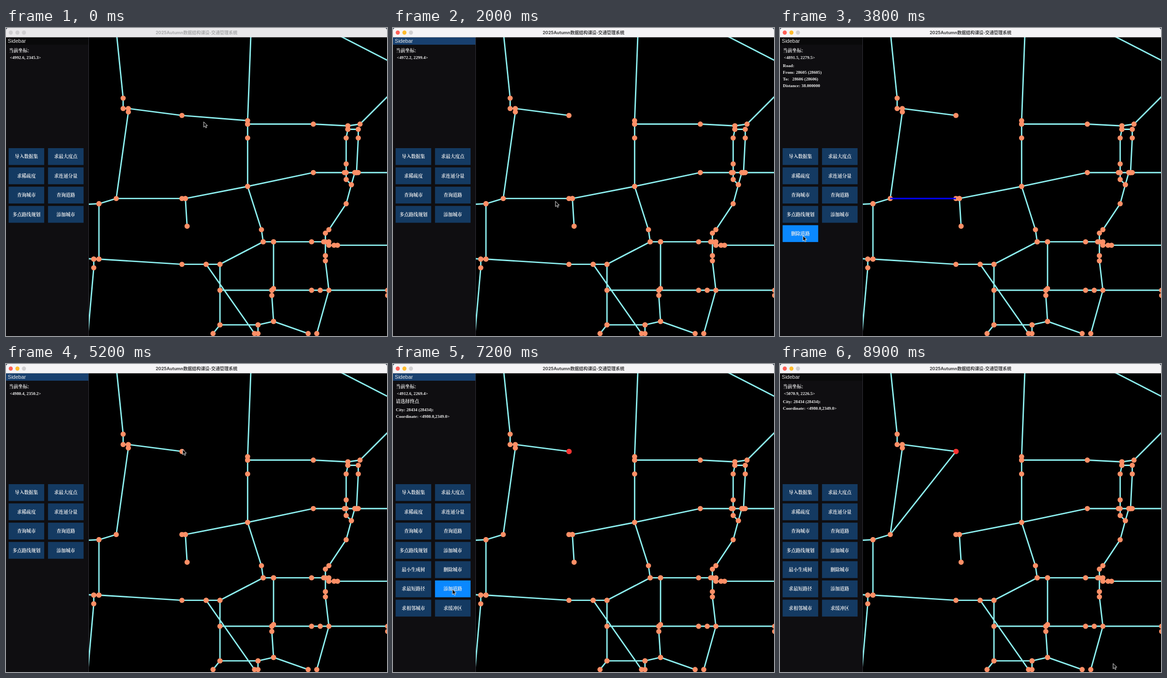
An HTML page that plays this animation: 800 by 646 pixels, repeating every 9 s.

```html
<!DOCTYPE html>
<html lang="zh">
<head>
<meta charset="utf-8">
<style>
  html, body { margin: 0; width: 100%; height: 100%; overflow: hidden; background: #1c2a3c; }
  svg { display: block; width: 800px; height: 646px; }
  text { white-space: pre; fill: #ececec; }
  .line { fill: none; stroke: #8ceeee; stroke-width: .8; }
  #nodes { fill: none; stroke: none; marker: url(#dot); }
  #picked { fill: none; stroke: #0000f5; stroke-width: .85; }
  .cjk { font: bold 9.8px "Noto Serif CJK SC", "Noto Sans CJK SC", "Noto Sans CJK", serif; }
  .info { font: bold 9.2px "Liberation Serif", serif; }
  .head { font: 11px "Liberation Sans", sans-serif; }
  .button rect { fill: #143a62; }
  .button.hover rect { fill: #0a88ff; }
  .button text { text-anchor: middle; }
  #bar { fill: #f5f4f6; }
  .title { font: 700 9px Inter, sans-serif; fill: #3c3c3e; }
  .title .han { font: 700 9.2px "Noto Sans CJK SC", "Noto Sans CJK", sans-serif; }
  .idle #bar { fill: #e9e8ea; }
  .idle .title { fill: #a8a8aa; }
  .idle .light { fill: #cecdcf; }
</style>
</head>
<body>
<svg id="app" viewBox="0 0 800 646">
  <defs>
    <marker id="dot" markerUnits="userSpaceOnUse" markerWidth="4" markerHeight="4" refX="2" refY="2">
      <circle cx="2" cy="2" r="1.5" fill="#ff8f66"/>
    </marker>
  </defs>

  <rect y="19" width="800" height="627"/>
  <g id="map">
    <path id="roads" class="line"/>
    <path id="north" class="line" d="M0 0 38 3"/>
    <path id="west" class="line" d="M-38 48H0"/>
    <path id="added" class="line" d="M0 0-38 48"/>
    <path id="nodes"/>
    <path id="picked"/>
    <circle id="city" cx=".1" r="1.5" fill="#ff3333"/>
  </g>

  <rect y="19" width="173.5" height="627" fill="#0f0e11"/>
  <rect x="173" y="19" width="1" height="627" fill="#313138"/>
  <rect id="head" y="19.5" width="173" height="15.5"/>
  <text class="head" x="3.8" y="31.3">Sidebar</text>
  <text class="cjk" x="6" y="51.3">当前坐标:</text>
  <text id="coord" class="info" x="8" y="65"></text>
  <text id="prompt" class="cjk" x="6" y="82">请选择终点</text>
  <g id="details" class="info"></g>
  <g id="buttons"></g>

  <path id="bar" d="M0 19.5V5Q0 0 5 0H795Q800 0 800 5V19.5Z"/>
  <circle class="light" cx="10" cy="9.6" r="4.3" fill="#ff5f57"/>
  <circle class="light" cx="24" cy="9.6" r="4.3" fill="#febc2e"/>
  <circle cx="37.7" cy="9.6" r="4.3" fill="#d0cfd1"/>
  <text class="title" x="400" y="13" text-anchor="middle">2025Autumn<tspan class="han">数据结构课设-交通管理系统</tspan></text>

  <path id="cursor" d="M0 0V11.2L2.6 8.8 4.3 12.7 6.3 11.9 4.6 8H8Z" fill="#080808" stroke="#fff" stroke-width=".9" stroke-linejoin="round"/>
</svg>

<script>
const $ = id => document.getElementById(id);
const NS = 'http://www.w3.org/2000/svg';
const LOOP = 9000, STEP = 100;
const DWELL = 300, CLICK = 200;

// Map units are centred on the chosen city; every path corner is a node.
const CITY = { id: 28434, x: 4980, y: 2349 };
const SCALE = 3.63, LEFT = 369.4, TOP = 183.4;
$('map').setAttribute('transform', `translate(${LEFT} ${TOP}) scale(${SCALE})`);

const streets = {
  northWest: 'M-38-49-34-10V-4H-31L0 0M-31-2-38 48-48 51-68 52M-48 51V83',
  southWest: 'M-60 82.3-51 83H-48L0 86H14 22L47 73M-51 83V88L-54.7 130',
  spine: 'M40-50 38 3V5 13 41L46 66 47 73H53 75 82 85V75H88 90 130',
  block: 'M38 5H76L96 6 103 5 125-17M96 6V8H102V13L101 33M96 8 95 13V28 37L98 40',
  east: 'M100 33 98 40 95 51 85 66 83 68V73 81 84L85 101 78 126',
  middle: 'M0 48H2L38 41 76 33H94 95 100 101 102 130M2 48 3 64',
  south: 'M14 86 42 126M22 86V121L18 126M22 121H44V126M44 121 53 119 73 126',
  cross: 'M53 73V100L52 101V104L53 119M22 101H52 75 80 119V104',
  corner: 'M85-49.2 125-28.7'
};
for (const id of ['roads', 'nodes']) $(id).setAttribute('d', Object.values(streets).join(''));

// Where the pointer arrives, and when; it rests, clicks and moves on.
const stops = [
  { at: 0, x: 4992.6, y: 2345.3 },
  { at: 1200, x: 4891.5, y: 2280 },
  { at: 2000, x: 4972.2, y: 2299.4 },
  { at: 3700, x: 4891.5, y: 2279.5 },
  { at: 5200, x: 4980.4, y: 2350.2 },
  { at: 6400, x: 4897.3, y: 2268.9 },
  { at: 7000, x: 4912.6, y: 2269.4 },
  { at: 7900, x: 4943.1, y: 2297.7 },
  { at: 8900, x: 5070.9, y: 2226.5 }
];

function pointer(t) {
  const i = stops.findLastIndex(s => s.at <= t);
  const a = stops[i], b = stops[i + 1] || a;
  const leave = a.at + DWELL;
  const p = t > leave && b !== a ? (t - leave) / (b.at - leave) : 0;
  const e = p * p * (3 - 2 * p);
  return { x: a.x + (b.x - a.x) * e, y: a.y + (b.y - a.y) * e };
}

function add(parent, tag, attrs) {
  const el = parent.appendChild(document.createElementNS(NS, tag));
  for (const k in attrs) el.setAttribute(k, attrs[k]);
  return el;
}

const W = 74.7, H = 35.3;
function button(label, slot, mode) {
  const x = 5.5 + slot % 2 * 82.7, y = 252 + (slot >> 1) * 40.4;
  const el = add($('buttons'), 'g', { class: 'button' });
  add(el, 'rect', { x, y, width: W, height: H });
  add(el, 'text', { x: x + W / 2, y: y + 21.4, class: 'cjk' }).textContent = label;
  return { el, x, y, mode };
}

const common = '导入数据集 求最大度点 求稀疏度 求连通分量 查询城市 查询道路 多点路线规划 添加城市'.split(' ');
const forCity = '最小生成树 删除城市 求最短路径 添加道路 求相邻城市 求缓冲区'.split(' ');
const buttons = [
  ...common.map((s, i) => button(s, i, 'any')),
  button('删除道路', common.length, 'road'),
  ...forCity.map((s, i) => button(s, common.length + i, 'city'))
];

const details = Array.from({ length: 4 }, () => add($('details'), 'text', { x: 6 }));
function showDetails(lines, top) {
  details.forEach((el, i) => {
    el.setAttribute('y', top + i * 14);
    el.textContent = lines[i] || '';
  });
}

const roadLines = (from, to, length) => [
  'Road:', `From: ${from} (${from})`, `To:   ${to} (${to})`, `Distance: ${length.toFixed(6)}`
];
const cityLines = [
  `City: ${CITY.id} (${CITY.id}):`,
  `Coordinate: <${CITY.x.toFixed(1)},${CITY.y.toFixed(1)}>`
];

const show = (el, on) => { el.style.display = on ? '' : 'none'; };

function draw(t) {
  const world = pointer(t);
  const x = LEFT + (world.x - CITY.x) * SCALE;
  const y = TOP - (world.y - CITY.y) * SCALE;
  const clicks = stops.filter(s => s.at + CLICK <= t).length;
  const road = { 1: 'north', 3: 'west' }[clicks];
  const city = clicks >= 5, asking = clicks === 7;

  $('app').classList.toggle('idle', clicks === 0);
  $('head').setAttribute('fill', [2, 4, 7].includes(clicks) ? '#18406f' : '#09090a');
  $('coord').textContent = `<${world.x.toFixed(1)}, ${world.y.toFixed(1)}>`;
  $('cursor').setAttribute('transform', `translate(${x} ${y})`);

  show($('north'), clicks < 2);
  show($('west'), clicks < 4);
  show($('added'), clicks >= 8);
  show($('city'), city);
  show($('prompt'), asking);
  show($('picked'), road);
  if (road) $('picked').setAttribute('d', $(road).getAttribute('d'));

  const lines = road === 'north' ? roadLines(CITY.id, CITY.id + 1, Math.hypot(38, 3))
    : road === 'west' ? roadLines(28605, 28606, 38)
    : city ? cityLines : [];
  showDetails(lines, asking ? 98.5 : 81.5);

  for (const b of buttons) {
    show(b.el, b.mode === 'any' || (b.mode === 'road' ? road : city));
    b.el.classList.toggle('hover', x >= b.x && x < b.x + W && y >= b.y && y < b.y + H);
  }
}

const began = performance.now();
function tick() {
  const t = (performance.now() - began) % LOOP;
  draw(Math.floor(t / STEP) * STEP);
  requestAnimationFrame(tick);
}
tick();
</script>
</body>
</html>
```
